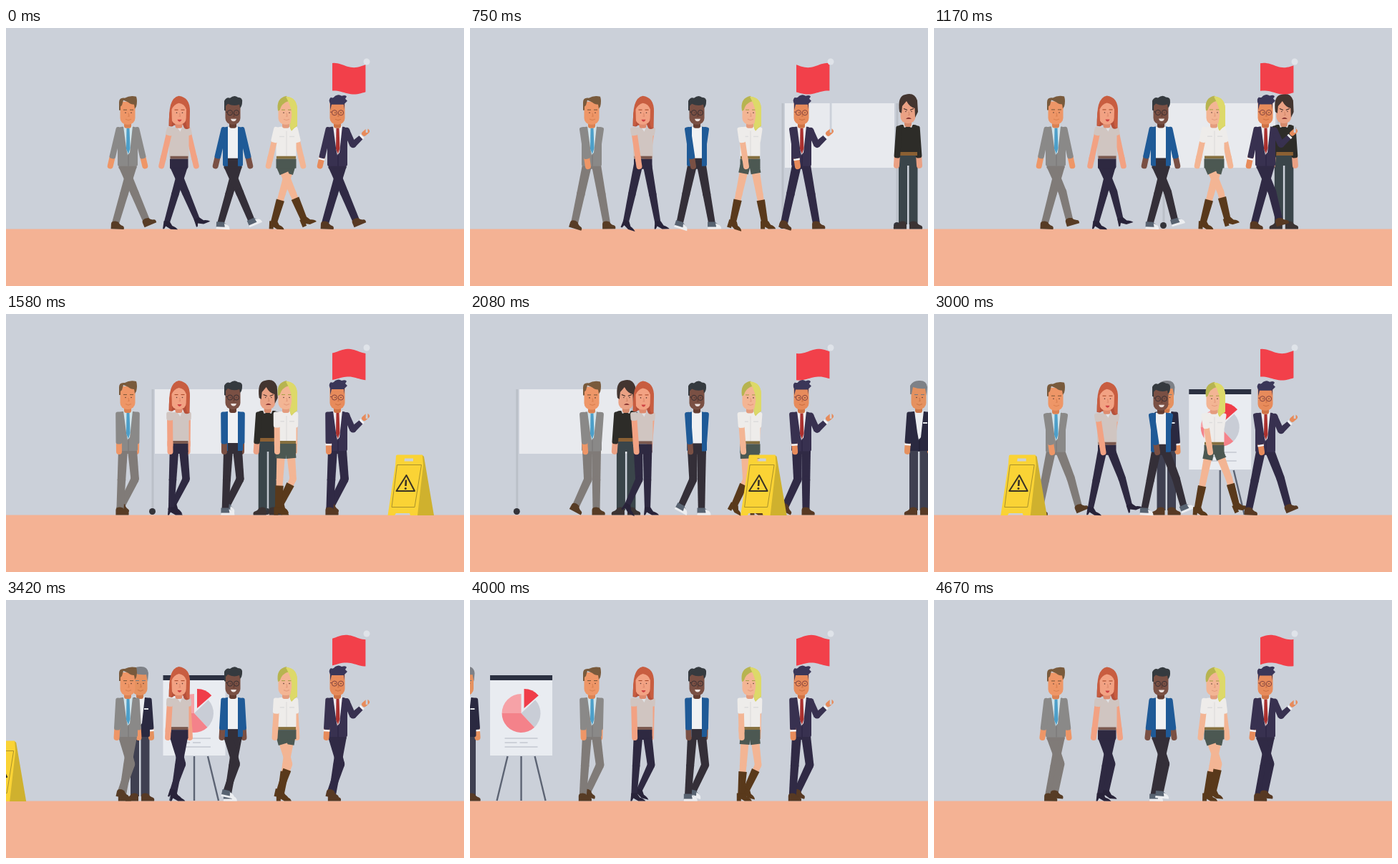
An HTML page with a canvas that plays this animation: 640x360 px, repeating every 4.76 s.

```html
<!DOCTYPE html>
<html lang="en">
<head>
<meta charset="utf-8">
<title>Follow the leader</title>
<style>
html, body { margin: 0; width: 640px; height: 360px; overflow: hidden; background: #cbd0d9; }
canvas { display: block; }
</style>
</head>
<body>
<canvas id="stage" width="640" height="360"></canvas>
<script>
const g = document.getElementById('stage').getContext('2d');
const LOOP = 4760, FPS = 12, STRIDE = 14.4, TAU = Math.PI * 2;
const SKY = '#cbd0d9', GROUND = '#f4b294';

// drawing helpers
function poly(color, ...p) {
  g.fillStyle = color;
  g.beginPath();
  for (let i = 0; i < p.length; i += 2) g.lineTo(p[i], p[i + 1]);
  g.closePath();
  g.fill();
}
function box(color, x, y, w, h, r = 0) {
  g.fillStyle = color;
  g.beginPath();
  g.roundRect(x, y, w, h, r);
  g.fill();
}
function disc(color, x, y, r) {
  g.fillStyle = color;
  g.beginPath();
  g.arc(x, y, r, 0, TAU);
  g.fill();
}
function line(color, width, ...p) {
  g.strokeStyle = color;
  g.lineWidth = width;
  g.beginPath();
  for (let i = 0; i < p.length; i += 2) g.lineTo(p[i], p[i + 1]);
  g.stroke();
}
function shape(color, d) {
  g.fillStyle = color;
  g.fill(new Path2D(d), 'evenodd');
}
function at(x, y, draw, turn = 0) {
  g.save();
  g.translate(x, y);
  g.rotate(turn);
  draw();
  g.restore();
}
function taper(color, x1, y1, w1, x2, y2, w2) {
  const len = Math.hypot(x2 - x1, y2 - y1) || 1;
  const nx = (y1 - y2) / len / 2, ny = (x2 - x1) / len / 2;
  poly(color, x1 + nx * w1, y1 + ny * w1, x2 + nx * w2, y2 + ny * w2,
    x2 - nx * w2, y2 - ny * w2, x1 - nx * w1, y1 - ny * w1);
}

// one stride of a foot: phase, ankle x, lift, tilt
const STEP = [
  [0, 29, 4, -.4], [.06, 26, 0, -.05], [.15, 15, 0, 0], [.33, -9, 0, 0],
  [.5, -20, 0, .05], [.65, -21, 1, .35], [.74, -19, 5, .5],
  [.82, -11, 6, .3], [.89, 2, 4, .08], [.95, 17, 5, -.2], [1, 29, 4, -.4]
];
function foot(phase) {
  const u = (phase % 1 + 1) % 1;
  const i = STEP.findIndex(s => s[0] > u);
  const a = STEP[i - 1], b = STEP[i], f = (u - a[0]) / (b[0] - a[0]);
  return a.map((v, n) => v + (b[n] - v) * f).slice(1);
}

const SHOES = {
  plain: p => shape(p.shoe, 'M-6 8V1Q-6-3 0-3L4-2Q6 2 10 3Q13 4 12 8Z'),
  heel: p => shape(p.shoe, 'M-5 8L-4-3H4L8 3Q14 5 16 8H6L-1 4L-3 8Z'),
  sneaker: p => {
    shape(p.shoe, 'M-6 6V-2H4L9 2L11 6Z');
    shape('#eceef1', 'M5 0Q13 2 13 8H-6V5H6Z');
  },
  boot: p => shape(p.shoe, 'M-6 8V-3H5L8 2Q14 4 15 8H5L0 5V8Z')
};

function leg(p, hipX, hipY, phase) {
  const [reach, lift, tilt] = foot(phase), bone = 40.5;
  const x = reach + hipX * .46, y = 272.5 - lift;
  const dx = x - hipX, dy = y - hipY, d = Math.hypot(dx, dy);
  const bend = Math.sqrt(Math.max(0, bone * bone - d * d / 4));
  const kx = hipX + dx / 2 + bend * dy / d, ky = hipY + dy / 2 - bend * dx / d;
  const [wh, wk, wa] = p.legs;
  taper(p.leg, hipX, hipY, wh, kx, ky, wk);
  disc(p.leg, kx, ky, wk / 2);
  taper(p.leg, kx, ky, wk, x, y, wa);
  if (p.foot === 'boot') {
    taper(p.shoe, kx + (x - kx) * .2, ky + (y - ky) * .2, wk + 2, x, y, wa + 2);
  }
  if (p.shorts) {
    taper(p.shorts, hipX, hipY, 14, hipX + (kx - hipX) * .28, hipY + (ky - hipY) * .28, 14);
  }
  at(x, y, () => SHOES[p.foot](p), tilt);
}

// side is -1 (near) or 1 (far); swing > 0 moves outwards
function arm(p, side, swing) {
  at(side * 12.5, 141, () => {
    box(p.skin, -4, 34, 8, 21, 4);
    if (p.bare) {
      box(p.skin, -4, -3, 8, 49, 4);
      box(p.sleeve, -4.8, -4.5, 9.6, p.bare, 3);
    } else {
      box(p.sleeve, -4.3, -4.5, 8.6, 45, 3);
      if (p.cuff) box('#f4f4f6', -4.3, 40, 8.6, 2.5);
    }
  }, -side * swing);
}

function face(p, mood) {
  box(p.shade, -5, 126, 10, 12, 3);
  box(p.skin, -10.5, 101, 21, 32, [3, 3, 9, 9]);
  const ink = '#5a3b35';
  disc(ink, -3, 116.5, .8);
  disc(ink, 5, 116.5, .8);
  line(p.shade, 1.2, 1, 117, 2, 121.5, 0, 121.5);
  if (p.glasses) {
    g.strokeStyle = p.glasses;
    g.lineWidth = 1;
    for (const x of [-4, 5]) {
      g.beginPath();
      g.arc(x, 116.5, 3.6, 0, TAU);
      g.stroke();
    }
    line(p.glasses, 1, -10, 115.5, -7.5, 115.5);
  } else {
    const tip = mood === 'cross' ? 2 : 0;
    line(p.brow, 1.1, -6, 112.5, -1, 112.5 + tip);
    line(p.brow, 1.1, 3, 112.5 + tip, 8, 112.5);
  }
  if (mood === 'grin') shape('#eadfdc', 'M-3 125H5Q4 128.5 1 128.5Q-2 128.5-3 125Z');
  else if (mood === 'lips') shape('#cf4444', 'M-2 126H4Q3 129 1 129Q-1 129-2 126Z');
  else if (mood === 'cross') shape('#8c3a35', 'M-3 127Q1 122.5 5 127Z');
  else line(p.shade, 1.2, -3, 125.5, 1, 127, 5, 125.5);
}

function suit(p) {
  box(p.sleeve, -14, 136, 28, 55, [6, 6, 2, 2]);
  poly(p.shirt, -6, 135, 7, 135, 3, 172, 0, 176, -2, 165);
  if (p.tie) poly(p.tie, -1.5, 138, 2.5, 138, 3.5, 166, 1, 174, -2, 167);
  line(p.seam, 1, 1, 174, 1, 191);
}

const MAN = { foot: 'plain', legs: [13, 11.5, 10] };
const walkers = [
  { ...MAN, x: 170, skin: '#ee9667', shade: '#db8253', brow: '#80593a', sleeve: '#8a8988',
    leg: '#807b78', seam: '#777575', shirt: '#d0e3ea', tie: '#4d9fc9', shoe: '#573c25',
    body: suit,
    head(p) {
      face(p);
      shape('#795a3c', 'M-12 113V102Q-12 95-4 96Q3 92 12 94Q14 100 12 108L10 111L9 105Q4 105 1 102Q-3 100-6 99L-8 106L-10 108V113Z');
    } },
  { x: 241.5, skin: '#f2a283', shade: '#df8b6e', brow: '#a94a2b', sleeve: '#d0c5c1', bare: 12,
    leg: '#2e2941', shoe: '#282339', foot: 'heel', legs: [12.5, 10.5, 8],
    body(p) {
      box(p.sleeve, -13.5, 137, 27.5, 43, [7, 7, 2, 2]);
      box('#7b594f', -12, 177, 25, 4);
      box(p.leg, -12.5, 181, 25.5, 12);
    },
    head(p) {
      shape('#b5503a', 'M-14 135Q-14 97 0 94Q14 95 15 114L15 138Q8 142 6 134H-7Q-8 137-14 135Z');
      poly('#dfe2e6', -5, 133, 6, 133, 2, 143);
      face(p, 'lips');
      shape('#c85d40', 'M-13 135Q-16 96 0 93Q16 95 15.5 115L14.5 138Q10 138 10 130L10.5 112Q8 104 0 103Q-7 105-10 112L-9.5 130Q-9 135-13 135Z');
    } },
  { x: 317, skin: '#7a5044', shade: '#663e32', glasses: '#3a3033', sleeve: '#1f5a97',
    leg: '#342f38', shoe: '#586371', foot: 'sneaker', legs: [13, 11, 9.5],
    body(p) {
      box(p.sleeve, -14, 136, 28, 55, [6, 6, 2, 2]);
      box('#f0f1f3', -7, 136, 14, 45);
      box(p.leg, -7, 180, 14, 12);
    },
    head(p) {
      face(p, 'grin');
      shape('#353a3f', 'M-12 113V100Q-9 94-4 96Q2 91 7 95Q14 95 13 102Q13 107 10 110L9 105Q1 108-7 104L-10 107V114Z');
    } },
  { x: 391, skin: '#f3b594', shade: '#e49c7e', brow: '#aba04a', sleeve: '#eeecea', bare: 22,
    leg: '#f3b594', shorts: '#4c5852', shoe: '#59391b', foot: 'boot', legs: [12, 9.5, 7],
    body(p) {
      box(p.sleeve, -13.5, 136, 28, 42, [6, 6, 2, 2]);
      line('#dad9d9', 1, 1, 142, 1, 177);
      box('#dddcdc', -9, 149, 7, 1.5);
      box('#dddcdc', 5, 149, 7, 1.5);
      box('#86703f', -13, 177, 27, 4);
      box(p.shorts, -13.5, 181, 28, 13);
    },
    head(p) {
      shape('#d6d264', 'M0 94Q17 95 16 115L16 135Q11 138 8 142Q4 137 6 125Z');
      face(p);
      shape('#b7b450', 'M-11 114Q-14 96 1 93L4 100Q-6 103-8.5 113Z');
      shape('#ddd969', 'M0 94Q17 94 16 116L16 134Q11 137 8 140Q5 134 8 123Q10 112 0 94Z');
    } },
  { ...MAN, x: 463, skin: '#e78b5b', shade: '#cf7345', glasses: '#84433f', sleeve: '#383150',
    leg: '#302a45', seam: '#292340', shirt: '#eeedf0', tie: '#ab312f', shoe: '#573923',
    cuff: true, raised: true, body: suit,
    head(p) {
      face(p);
      shape('#3a3658', 'M-10 113V104Q-13 98-9 95Q-6 97-3 93Q2 90 6 93Q12 91 13 94L11 97L14 100L10 104V112L9 105H-8Z');
    } }
];

function raisedArm(p) {
  taper(p.sleeve, 13, 142, 9, 22, 162, 9);
  disc(p.sleeve, 13, 141.5, 4.5);
  disc(p.sleeve, 22, 161, 4.5);
  taper(p.sleeve, 22, 161, 9, 34, 150, 7);
  taper('#f4f4f6', 33, 151, 7.5, 35, 149, 7.5);
  at(39.5, 144, () => box(p.skin, -6, -3.5, 12, 7, 3.5), -.7);
}

function walker(p, phase) {
  const c = Math.cos(TAU * (phase - .06));
  const swing = c * (c > 0 ? .25 : .16);
  const bob = 1 + Math.cos(2 * TAU * (phase - .06));
  at(p.x, 0, () => {
    at(0, bob, () => { if (!p.raised) arm(p, 1, swing); });
    leg(p, 6.5, 190 + bob, phase + .5);
    leg(p, -6.5, 190 + bob, phase);
    at(0, bob, () => {
      if (!p.shorts) box(p.leg, -12.5, 184, 25, 11, 2);
      p.body(p);
      p.head(p);
      if (p.raised) raisedArm(p);
      arm(p, -1, swing);
    });
  });
}

// bystanders
function stander(p) {
  box(p.leg, -13, 178, 12, 96);
  box(p.leg, 1.5, 178, 12, 96);
  box(p.leg, -13, 178, 26, 14);
  at(-8, 272.5, () => {
    g.scale(-1, 1);
    SHOES.plain(p);
  });
  at(8, 272.5, () => SHOES.plain(p));
  arm(p, 1, .07);
  p.body(p);
  p.head(p);
  arm(p, -1, .07);
}
const grump = {
  skin: '#eaa184', shade: '#d58a6c', brow: '#3f2c27', sleeve: '#2d2c28', leg: '#3a454a', shoe: '#3b3333',
  body(p) {
    box(p.sleeve, -15, 135, 30, 39, [6, 6, 0, 0]);
    poly('#e6e6e8', -7, 134, 7, 134, 5, 139, 0, 137, -5, 139);
    box('#8b6033', -13, 173, 26, 5);
  },
  head(p) {
    face(p, 'cross');
    shape('#433530', 'M-12 117Q-15 95-4 93Q9 89 13 101L14 117L10 125L9.5 112Q2 110-2 102L-8 109L-9 119Z');
  }
};
const elder = {
  skin: '#e5915f', shade: '#cd7849', brow: '#777a80', sleeve: '#2a2940', leg: '#3f4051', shoe: '#573a25',
  shirt: '#eceef1', seam: '#1f1e30', cuff: true,
  body(p) {
    suit(p);
    box('#e6e8eb', 6, 151, 6, 2);
  },
  head(p) {
    face(p);
    shape('#7e8187', 'M-12 112V100Q-8 93 0 93Q11 92 12 102L11 114L9 104Q0 105-8 102L-10 112Z');
  }
};

// props
function whiteboard() {
  for (const x of [-1, 159]) {
    box('#bbc0c8', x - 1.5, 105, 3, 169);
    disc('#34343a', x - .5, 275.5, 4.5);
  }
  box('#e8eaee', 2, 105, 153, 90);
}

function flipchart() {
  const leg = '#5c6373';
  line(leg, 2.4, -19, 218, -34, 280);
  line(leg, 2.4, 0, 218, 0, 280);
  line(leg, 2.4, 19, 218, 34, 280);
  box('#e9ecf1', -43.5, 106, 87, 111);
  box('#2b3041', -43.5, 105, 87, 7);
  const slice = (color, from, to, x = 0, y = 158) => {
    g.fillStyle = color;
    g.beginPath();
    g.moveTo(x, y);
    g.arc(x, y, 27, from * TAU, to * TAU);
    g.fill();
  };
  slice('#c9cdd6', -.12, .13);
  slice('#f4828a', .13, .5);
  slice('#f6a2a7', .5, .75);
  slice('#f03d49', -.25, -.115, 4, 151);
  const rule = '#cdd1d9';
  box(rule, -23, 192, 46, 2);
  box(rule, -23, 198, 17, 2);
  box(rule, -2, 198, 11, 2);
  box(rule, -23, 204, 46, 2);
}

function sign() {
  poly('#cfb12e', 48, 197, 50, 199, 64, 281, 40, 281);
  shape('#fad335', 'M11 198Q11 196.5 13 196.5H48L49 211L41 281H31L30 278H11L9 281H-.5L10 211Z M23 201.5H35V205.5H22.5Z');
  const ink = '#3a3324';
  g.lineJoin = 'round';
  line('#a8902b', 1, 12.5, 210.5, 46.5, 210.5, 37, 269.5, 5, 269.5, 12.5, 210.5);
  line(ink, 2, 25.5, 225, 11.5, 247, 37, 247, 25.5, 225, 25, 226);
  line(ink, 2.6, 25, 231.5, 24.5, 240);
  disc(ink, 24.3, 243.5, 1.5);
}

function flag(k) {
  const wave = s => -3.2 * Math.cos(TAU * ((s - .5) / 1.2 + .38 + 2 * k / STRIDE));
  const edge = [];
  for (let i = 0; i <= 20; i++) edge.push(456 + i * 2.33, 52 + wave(i / 20));
  for (let i = 20; i >= 0; i--) edge.push(456 + i * 2.33, 90 + wave(i / 20) * .8);
  poly('#f2404a', ...edge);
}

function draw(k) {
  box(SKY, 0, 0, 640, 360);
  box(GROUND, 0, 280.5, 640, 80);
  const phase = k / STRIDE;
  const pass = (x, k0, speed, paint) => at(x - speed * (k - k0), 0, paint);
  pass(438, 9, 23.2, whiteboard);
  pass(536.5, 31, 27.35, flipchart);
  pass(612, 9, 24.63, () => stander(grump));
  pass(187, 41, 27.5, () => stander(elder));
  flag(k);
  walkers.forEach(p => walker(p, phase));
  box('#cbd0d9', 502.7, 48, 2.8, 98);
  disc('#dfe3e9', 504, 47, 4.5);
  pass(534, 19, 25.9, sign);
}

const start = performance.now();
function tick() {
  const t = (performance.now() - start) % LOOP;
  draw(Math.min(56, Math.floor((t + 3.4) * FPS / 1000)));
  requestAnimationFrame(tick);
}
tick();
</script>
</body>
</html>
```
